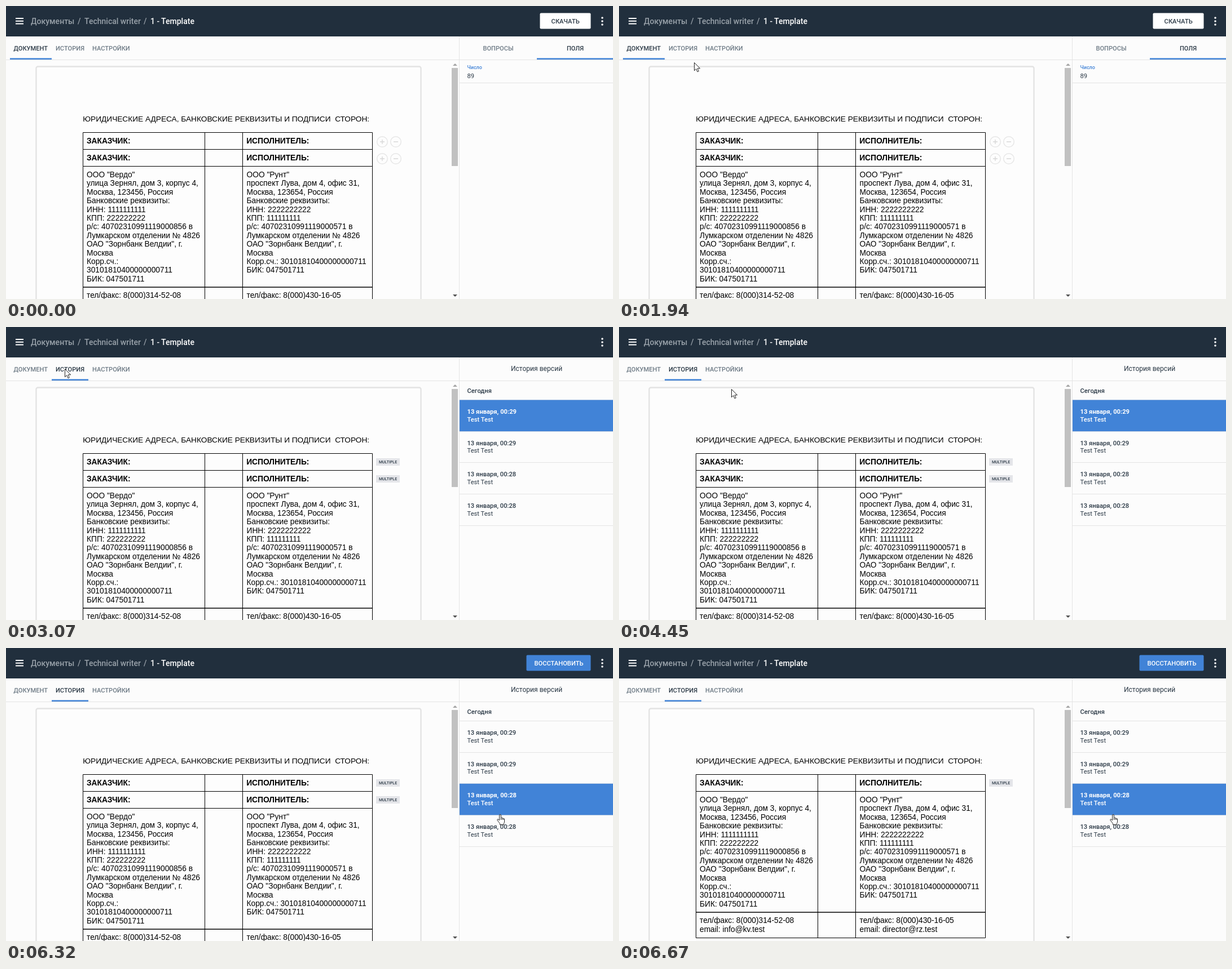
Write an HTML page that moves like this. It is 1076x520 px and loops after 8 s.

```html
<!DOCTYPE html>
<html lang="ru">
<head>
<meta charset="utf-8">
<title>История версий</title>
<style>
html, body { margin: 0; width: 100%; height: 100%; overflow: hidden; background: #fcfcfc; }
svg { display: block; }
text { font-family: Roboto, sans-serif; font-size: 11.2px; fill: #2b3946; white-space: pre; }
.m { font-weight: 500; }
.mid { text-anchor: middle; }
.crumb { font-size: 14px; font-weight: 500; fill: #98a1a9; }
.tab { font-size: 11.1px; font-weight: 500; fill: #6d7a85; }
.tab.on { fill: #2b3946; }
.doc text { font-family: "Liberation Sans", Arial, sans-serif; font-size: 13.75px; fill: #000; }
.doc .title { font-size: 13.68px; }
.doc .b { font-weight: 700; }
.grid { fill: none; stroke: #000; }
.btn circle { fill: #fdfdfd; stroke: #e7e7e7; stroke-width: 1.5; }
.btn path { stroke: #d8d8d8; stroke-width: 1.4; fill: none; }
.btn.hot circle { fill: #e2e4e6; stroke: #e2e4e6; }
.btn.hot path { stroke: #3c444b; }
.badge rect { fill: #e4e5e9; }
.doc .badge text { font: 500 7px Roboto, sans-serif; fill: #2b3946; }
.rule { stroke: #e4e4e4; }
.item rect { fill: none; }
.item.on rect { fill: #4183d7; }
.item.on text { fill: #fff; font-weight: 500; }
.item.on .m { font-weight: 700; }
.cursor { fill: #fff; stroke: #222; stroke-linejoin: round; }
</style>
</head>
<body>
<svg id="stage" width="1076" height="520" viewBox="0 0 1076 520"></svg>
<script>
const BLUE = '#4183d7';
const text = (x, y, s, cls = '') => `<text x="${x}" y="${y}" class="${cls}">${s}</text>`;
const rect = (x, y, w, h, fill, extra = '') =>
  `<rect x="${x}" y="${y}" width="${w}" height="${h}" fill="${fill}" ${extra}/>`;
const group = (id, body, cls = '') => `<g id="${id}" class="${cls}">${body}</g>`;
const rule = (y) => `<path class="rule" d="M804 ${y}H1076"/>`;

// Document table
const cells = (y, h) =>
  `<path class="grid" d="M136.5 ${y}H649.5V${y + h}H136.5ZM352.5 ${y}v${h}M419.5 ${y}v${h}"/>`;
const headRow = (y) => cells(y, 30) +
  text(143, y + 19.5, 'ЗАКАЗЧИК:', 'b') + text(426.2, y + 19.5, 'ИСПОЛНИТЕЛЬ:', 'b');
const lines = (x, y, list) => list.map((s, i) => text(x, (y + i * 15.4).toFixed(1), s)).join('');

const bank = ['Лумкарском отделении № 4826', 'ОАО "Зорнбанк Велдии", г.', 'Москва'];
const customer = ['ООО "Вердо"', 'улица Зернял, дом 3, корпус 4,', 'Москва, 123456, Россия',
  'Банковские реквизиты:', 'ИНН: 1111111111', 'КПП: 222222222', 'р/с: 40702310991119000856 в',
  ...bank, 'Корр.сч.:', '30101810400000000711', 'БИК: 047501711'];
const contractor = ['ООО "Рунт"', 'проспект Лува, дом 4, офис 31,', 'Москва, 123654, Россия',
  'Банковские реквизиты:', 'ИНН: 2222222222', 'КПП: 111111111', 'р/с: 40702310991119000571 в',
  ...bank, 'Корр.сч.: 30101810400000000711', 'БИК: 047501711'];

const tableBody = cells(284.5, 214.5) + cells(499, 45.5) +
  lines(143, 304, customer) + lines(426.5, 304, contractor) +
  lines(143, 518.2, ['тел/факс: 8(000)314-52-08', 'email: info@kv.test']) +
  lines(426.5, 518.2, ['тел/факс: 8(000)430-16-05', 'email: director@rz.test']);

const buttons = (id, y) => group(id,
  `<circle cx="667" cy="${y}" r="9.3"/><circle cx="691" cy="${y}" r="9.3"/>` +
  `<path d="M663 ${y}h8M667 ${y - 4}v8M687 ${y}h8"/>`, 'btn');
const badge = (id, y) => group(id, rect(656, y - 6.5, 42, 13, '') +
  text(677, y + 2.5, 'MULTIPLE', 'mid'), 'badge');

const page = rect(53.5, 107.5, 682, 440, '#fdfdfd', 'rx="3" stroke="#e3e3e3" stroke-width="2.4"') +
  text(136.3, 205, 'ЮРИДИЧЕСКИЕ АДРЕСА, БАНКОВСКИЕ РЕКВИЗИТЫ И ПОДПИСИ\u00a0 СТОРОН:', 'title') +
  headRow(224.5) + group('copy', headRow(254.5)) + group('body', tableBody) +
  group('edit', buttons('btn1', 241) + buttons('btn2', 271)) +
  group('marks', badge('mark1', 239.5) + badge('mark2', 269.5));

const veil = rect(53, 107, 683, 413, '#f0f0f0', 'id="veil"') +
  group('spin', '<circle cx="391" cy="299" r="16" fill="#f9f9f9" stroke="#e6e6e6" stroke-width="1.3"/>' +
    '<circle cx="407" cy="299" r=".8" fill="#bbb"/>');

const scrollbar = rect(790, 110, 11, 174, '#c1c1c1') +
  '<path d="M792 106l4-4 4 4z" fill="#a3a3a3"/><path d="M792 512l4 4 4-4z" fill="#505050"/>';

// Header and tabs
const header = rect(0, 0, 1076, 54, '#212f3d') +
  '<path d="M17 22H31M17 26.7H31M17 31.4H31" stroke="#fff" stroke-width="2"/>' +
  text(44, 32, 'Документы', 'crumb') + text(127, 32, '/', 'crumb') +
  text(139, 32, 'Technical writer', 'crumb') + text(244, 32, '/', 'crumb') +
  '<text x="256" y="32" class="crumb" style="fill:#fff">1 - Template</text>' +
  [21, 27, 33].map(y => `<circle cx="1057" cy="${y}" r="1.8" fill="#fff"/>`).join('') +
  group('download', rect(946.5, 12.5, 90, 28, '#fff', 'rx="2"') + text(991.7, 31, 'СКАЧАТЬ', 'm mid')) +
  group('restore', rect(922.5, 12.5, 114, 28, BLUE, 'rx="2"') +
    '<text x="980" y="31" class="m mid" style="fill:#fff">ВОССТАНОВИТЬ</text>');

const tabs = '<path class="rule" d="M0 95.5H1076M803.5 54V520"/>' +
  group('tab1', text(13.5, 79, 'ДОКУМЕНТ')) + group('tab2', text(88, 79, 'ИСТОРИЯ')) +
  text(153, 79, 'НАСТРОЙКИ', 'tab') + rect(7, 92.5, 74, 2.5, BLUE, 'id="bar"');

// Side panels
const fields = text(872.5, 79, 'ВОПРОСЫ', 'tab mid') + text(1009, 79, 'ПОЛЯ', 'tab on mid') +
  rect(941, 92.5, 135, 2.5, BLUE) +
  `<text x="817.5" y="112" class="m" style="font-size:9px;fill:${BLUE}">Число</text>` +
  text(817.5, 128, '89') + rule(136.5);

const version = (minute, i) => {
  const y = 129.5 + i * 55.65;
  return rule(Math.floor(y + 55.65) + 0.5) + group('item' + i, rect(804, y, 272, 55.65, '') +
    text(817.5, y + 24.5, `13 января, 00:${minute}`, 'm') +
    text(817.5, y + 38.2, 'Test Test'), 'item');
};
const history = '<text x="940.5" y="77.5" class="mid" style="font-size:12.1px">История версий</text>' +
  text(817.5, 116.5, 'Сегодня', 'm') + rule(129.5) + [29, 29, 28, 28].map(version).join('');

const cursors =
  '<path id="arrow" class="cursor" d="M.5.5V14.7L3.8 11.6 6 16.8 8.3 15.8 6.1 10.8H10.6Z"/>' +
  group('hand', '<path d="M4.6 11V2Q4.6.6 6 .6T7.4 2V6.2Q8.8 5.5 9.8 7 11.2 6.2 12 7.8 13.6 7.4 13.6 9.4V13Q13.6 15 12.4 16.4V18.6H5.6V16.6Q3.4 14 1 10.6.4 9.2 1.8 8.8 3 8.8 4.6 11Z"/>' +
    '<path d="M7.4 6.4V10M9.8 7.2V10M12 8V10"/>', 'cursor');

const $ = (id) => document.getElementById(id);
$('stage').innerHTML = rect(0, 0, 1076, 520, '#fcfcfc') + group('page', page, 'doc') + veil + scrollbar +
  tabs + group('fields', fields) + group('history', history) + header + cursors;

// Pointer stops: time, x, y, and 1 for the hand
const stops = [
  [730, 535, 500], [840, 520, 484], [950, 488, 450], [1060, 443, 402], [1170, 383, 340],
  [1280, 296.5, 252], [1390, 244, 200], [1500, 221, 177],
  [1600, 196, 152], [1710, 161, 125], [1820, 146, 110], [1930, 133, 100], [2040, 117, 91, 1],
  [2150, 109, 84, 1], [2260, 102, 78, 1], [2370, 97, 73, 1], [2590, 98, 64, 1], [2730, 100.5, 73, 1],
  [2930, 104, 74], [4350, 140, 86], [4450, 199, 110],
  [4590, 260, 131], [4690, 332, 156], [4800, 405, 180], [4900, 468.5, 198],
  [5050, 560, 223], [5140, 640, 245], [5230, 718, 263], [5320, 775, 273.5],
  [5460, 812.5, 281, 1], [5560, 845, 289, 1], [5670, 859.5, 293, 1], [5820, 866, 294, 1], [5890, 870, 295, 1]
];

const show = (id, on) => { $(id).style.display = on ? '' : 'none'; };
const toggle = (id, cls, on) => $(id).classList.toggle(cls, on);
const within = (v, a, b) => v >= a && v < b;

function draw(t) {
  const past = t >= 2830, picked = t >= 6320, older = t >= 6570;
  show('download', !past);
  show('restore', picked);
  show('fields', !past);
  show('history', past);
  show('edit', !past);
  show('marks', past);
  show('copy', !older);
  show('mark2', !older);
  $('body').setAttribute('transform', `translate(0 ${older ? -30 : 0})`);
  $('bar').setAttribute('x', past ? 81 : 7);
  $('bar').setAttribute('width', past ? 65 : 74);
  $('tab1').firstChild.setAttribute('class', past ? 'tab' : 'tab on');
  $('tab2').firstChild.setAttribute('class', past ? 'tab on' : 'tab');
  toggle('item0', 'on', !picked);
  toggle('item2', 'on', picked);

  const loading = within(t, 2930, 3070) || within(t, 6430, 6570);
  $('veil').setAttribute('opacity', loading ? 0.5 : within(t, 6570, 6670) ? 0.25 : 0);
  show('spin', loading);

  const at = stops.filter(s => s[0] <= t).pop();
  show('arrow', at && !at[3]);
  show('hand', at && at[3]);
  if (at) $(at[3] ? 'hand' : 'arrow').setAttribute('transform', `translate(${at[1]} ${at[2]})`);
  const inTable = !!at && within(at[1], 136, 650);
  toggle('btn1', 'hot', inTable && within(at[2], 222, 252));
  toggle('btn2', 'hot', inTable && within(at[2], 252, 282));
}

function tick() {
  draw(performance.now() % 8000);
  requestAnimationFrame(tick);
}
tick();
</script>
</body>
</html>
```
